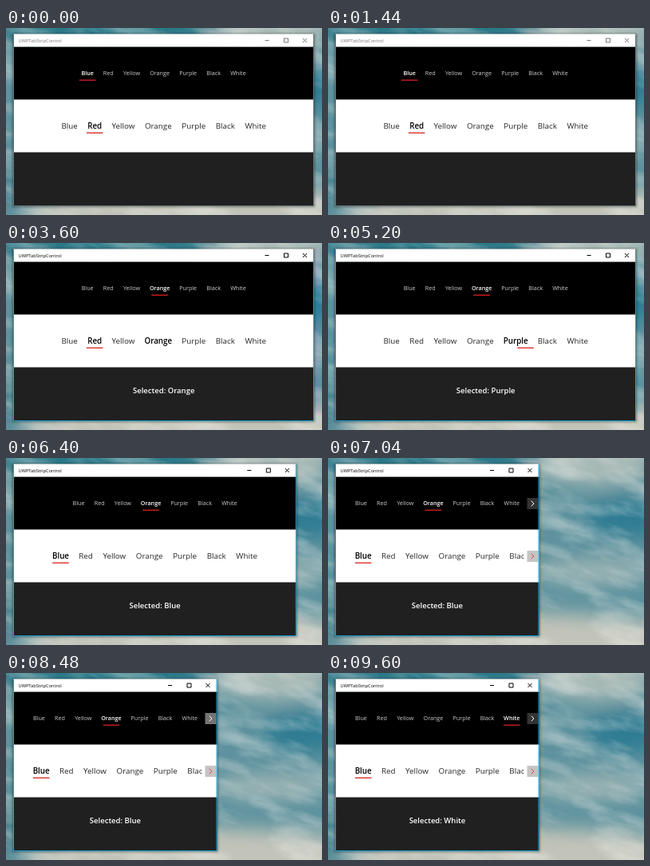
Write an HTML page that moves like this. It is 396 px wide and 234 px high and loops after 9680 ms.

```html
<!DOCTYPE html>
<html lang="en">
<head>
<meta charset="utf-8">
<title>UWPTabStripControl</title>
<style>
  html, body { margin: 0; width: 100%; height: 100%; overflow: hidden; background: #5b8993; }
  svg { display: block; width: 396px; height: 234px; }
  text { font-family: "Open Sans", "Noto Sans", sans-serif; }
  .mid { text-anchor: middle; }
</style>
</head>
<body>
<svg viewBox="0 0 396 234" xmlns="http://www.w3.org/2000/svg">
  <defs>
    <filter id="blur" x="-50%" y="-50%" width="200%" height="200%"><feGaussianBlur stdDeviation="12"/></filter>
    <filter id="soft"><feGaussianBlur stdDeviation="1.5"/></filter>
    <filter id="wisps" x="0" y="0" width="100%" height="100%">
      <feTurbulence type="fractalNoise" baseFrequency=".014 .04" numOctaves="5" seed="8"/>
      <feColorMatrix values="0 0 0 0 .88  0 0 0 0 .88  0 0 0 0 .84  2.6 0 0 0 -1.05"/>
    </filter>
    <clipPath id="strip"><rect id="clip" x="10" y="23" height="133"/></clipPath>
  </defs>
  <rect width="396" height="234" fill="#5d929e"/>
  <g filter="url(#blur)">
    <ellipse cx="130" cy="0" rx="150" ry="16" fill="#1f6f80"/>
    <ellipse cx="335" cy="6" rx="75" ry="28" fill="#a9bab6"/>
    <ellipse cx="372" cy="74" rx="50" ry="26" fill="#2f7c93"/>
    <ellipse cx="275" cy="90" rx="30" ry="24" fill="#5f929e"/>
    <ellipse cx="330" cy="142" rx="70" ry="14" fill="#a6b9b7"/>
    <ellipse cx="0" cy="195" rx="14" ry="34" fill="#3f7d8a"/>
    <ellipse cx="250" cy="236" rx="230" ry="42" fill="#c3c4b9"/>
  </g>
  <rect x="-60" y="-120" width="560" height="460" transform="rotate(16 198 117)" filter="url(#wisps)" opacity=".4"/>
  <rect id="shadow" x="8" y="7" height="217" fill="#000" opacity=".4" filter="url(#soft)"/>
  <g id="win"></g>
</svg>
<script>
const LOOP = 9680, STEP = 80, SLIDE = 560;
const LEFT = 9, FULL = 386, PAD = 34, MIDDLE = 197.7;
const NAMES = ['Blue', 'Red', 'Yellow', 'Orange', 'Purple', 'Black', 'White'];
const $ = id => document.getElementById(id);
const win = $('win');

function set(el, attrs) {
  for (const k in attrs) el.setAttribute(k, attrs[k]);
}
function add(parent, tag, attrs, text) {
  const el = document.createElementNS('http://www.w3.org/2000/svg', tag);
  set(el, attrs);
  if (text) el.textContent = text;
  parent.append(el);
  return el;
}

const panels = ['#000', '#fff', '#202020'].map((fill, i) =>
  add(win, 'rect', { x: LEFT, y: 23.5 + 66 * i, height: 66.5, fill }));
panels.push(add(win, 'rect', { x: LEFT, y: 7.5, height: 16, fill: '#fff' }));
const title = add(win, 'text', { x: 15.5, y: 17.8, 'font-size': 5.7, 'font-weight': 500 }, 'UWPTabStripControl');
const buttons = add(win, 'path', {
  d: 'M-61.5 15.5h5M-37.5 13h5v5h-5zM-14 13l5 5M-9 13l-5 5', fill: 'none'
});
const message = add(win, 'text', {
  class: 'mid', y: 187.6, 'font-size': 9.5, 'font-weight': 600, fill: '#fff'
});

// A row of labels laid out by their own widths, centred in the window
function makeStrip(o) {
  const row = add(add(win, 'g', { 'clip-path': 'url(#strip)' }), 'g', {});
  const labels = NAMES.map(name => add(row, 'text', {
    class: 'mid', y: o.mid + o.size * .34, 'font-size': o.size
  }, name));
  const widths = labels.map(el => el.getComputedTextLength());
  const total = widths.reduce((a, b) => a + b + o.gap);
  const left = MIDDLE - total / 2;
  let x = left;
  const centers = widths.map((w, i) => {
    const c = x + w / 2;
    set(labels[i], { x: c });
    x += w + o.gap;
    return c;
  });
  const bar = add(row, 'rect', { y: o.barY, width: 20.5, height: 1.3, fill: '#dc2020' });
  const arrow = add(win, 'g', {});
  const box = add(arrow, 'rect', { x: -15, y: o.mid - 7, width: 14, height: 14 });
  add(arrow, 'path', {
    d: `M-9.8 ${o.mid - 3.3}l3.3 3.3l-3.3 3.3`, fill: 'none', stroke: o.chevron
  });
  return { ...o, row, labels, centers, minShift: PAD - left, bar, arrow, box };
}

const strips = [
  makeStrip({
    size: 7.2, gap: 12.2, mid: 57, barY: 64.6, start: 0, idle: '#cdcdcd', on: '#fff',
    fill: '#333', hot: '#747474', chevron: '#fff'
  }),
  makeStrip({
    size: 9.8, gap: 12.6, mid: 123, barY: 130.6, start: 1, idle: '#262626', on: '#000',
    fill: '#c6c4c2', hot: '#d4d4d4', chevron: '#d84444'
  })
];
const [top7, low7] = strips;
const frame = add(win, 'path', { fill: 'none' });

// The unseen pointer: it hovers, presses tabs and drags the window edge
const EDGE_END = 264.5;
const tab = (s, i, t, press) => ({ t, x: s.centers[i], y: s.mid, press });
const GRAB = { t: 6160, x: FULL, y: 190 }, DROP = { t: 7040, x: EDGE_END, y: 190 };
const path = [
  { t: 0, x: 40, y: 80 },
  tab(top7, 2, 1840, true),
  tab(top7, 4, 2560),
  tab(top7, 3, 3040, true),
  tab(low7, 3, 3600),
  tab(low7, 4, 4880, true),
  tab(low7, 4, 5280),
  tab(low7, 0, 5680, true),
  GRAB, DROP,
  { t: 8480, x: EDGE_END - 8, y: top7.mid },
  { t: 9040, x: top7.centers[6] + top7.minShift, y: top7.mid, press: true },
  { t: LOOP, x: 231, y: top7.mid }
];

const smooth = p => p * p * (3 - 2 * p);
const backOut = p => 1 + 2.7 * (p - 1) ** 3 + 1.7 * (p - 1) ** 2;

function pointer(t) {
  const i = path.findIndex((k, n) => n && k.t >= t);
  const a = path[i - 1], b = path[i], p = smooth((t - a.t) / (b.t - a.t));
  return { x: a.x + (b.x - a.x) * p, y: a.y + (b.y - a.y) * p };
}
const rightEdge = t => t < GRAB.t ? FULL : t > DROP.t ? EDGE_END : pointer(t).x;
const shiftAt = t => (rightEdge(t) - FULL) / 2;

function tabAt(s, t) {
  const { x, y } = pointer(t), dx = Math.max(s.minShift, shiftAt(t));
  if (Math.abs(y - s.mid) > 12) return -1;
  return s.centers.findIndex(c => Math.abs(c + dx - x) < s.size * 1.8);
}

const presses = path.filter(k => k.press).map(({ t }) => {
  const strip = strips.find(s => tabAt(s, t) >= 0);
  return { t, strip, tab: tabAt(strip, t) };
});

function drawStrip(s, t, right, shift) {
  const done = presses.filter(k => k.strip === s && k.t <= t);
  const tabs = [s.start, ...done.map(k => k.tab)];
  const picked = tabs.at(-1), hover = tabAt(s, t);
  s.labels.forEach((el, i) => {
    const lit = i === picked || i === hover;
    set(el, { fill: lit ? s.on : s.idle, 'font-weight': lit ? 600 : 400 });
  });

  let x = s.centers[picked];
  if (done.length) {
    const from = s.centers[tabs.at(-2)];
    x = from + (x - from) * backOut(Math.min(1, (t - done.at(-1).t) / SLIDE));
  }
  set(s.bar, { x: x - 10.25 });
  set(s.row, { transform: `translate(${Math.max(s.minShift, shift)})` });

  const at = pointer(t);
  const hot = Math.abs(at.x - right + 8) < 7 && Math.abs(at.y - s.mid) < 7;
  set(s.box, { fill: hot ? s.hot : s.fill });
  set(s.arrow, {
    transform: `translate(${right})`,
    visibility: shift < s.minShift ? 'visible' : 'hidden'
  });
}

function draw(t) {
  const right = rightEdge(t), width = right - LEFT, shift = shiftAt(t);
  const last = presses.filter(k => k.t <= t).at(-1);
  panels.forEach(p => set(p, { width }));
  set($('shadow'), { width: width + 2 });
  set($('clip'), { width: right - 10 - (shift < low7.minShift ? 19 : 0) });
  set(frame, {
    d: `M9.5 7.5V222.5H${right - .5}V7.5`,
    stroke: last ? '#18a4d6' : '#65777c'
  });
  set(title, { fill: last ? '#000' : '#777' });
  set(buttons, { transform: `translate(${right})`, stroke: last ? '#000' : '#777' });
  strips.forEach(s => drawStrip(s, t, right, shift));
  set(message, { x: MIDDLE + shift });
  message.textContent = last ? 'Selected: ' + NAMES[last.tab] : '';
}

function tick() {
  const t = performance.now() % LOOP;
  draw(Math.floor(t / STEP) * STEP);
  requestAnimationFrame(tick);
}
tick();
</script>
</body>
</html>
```
